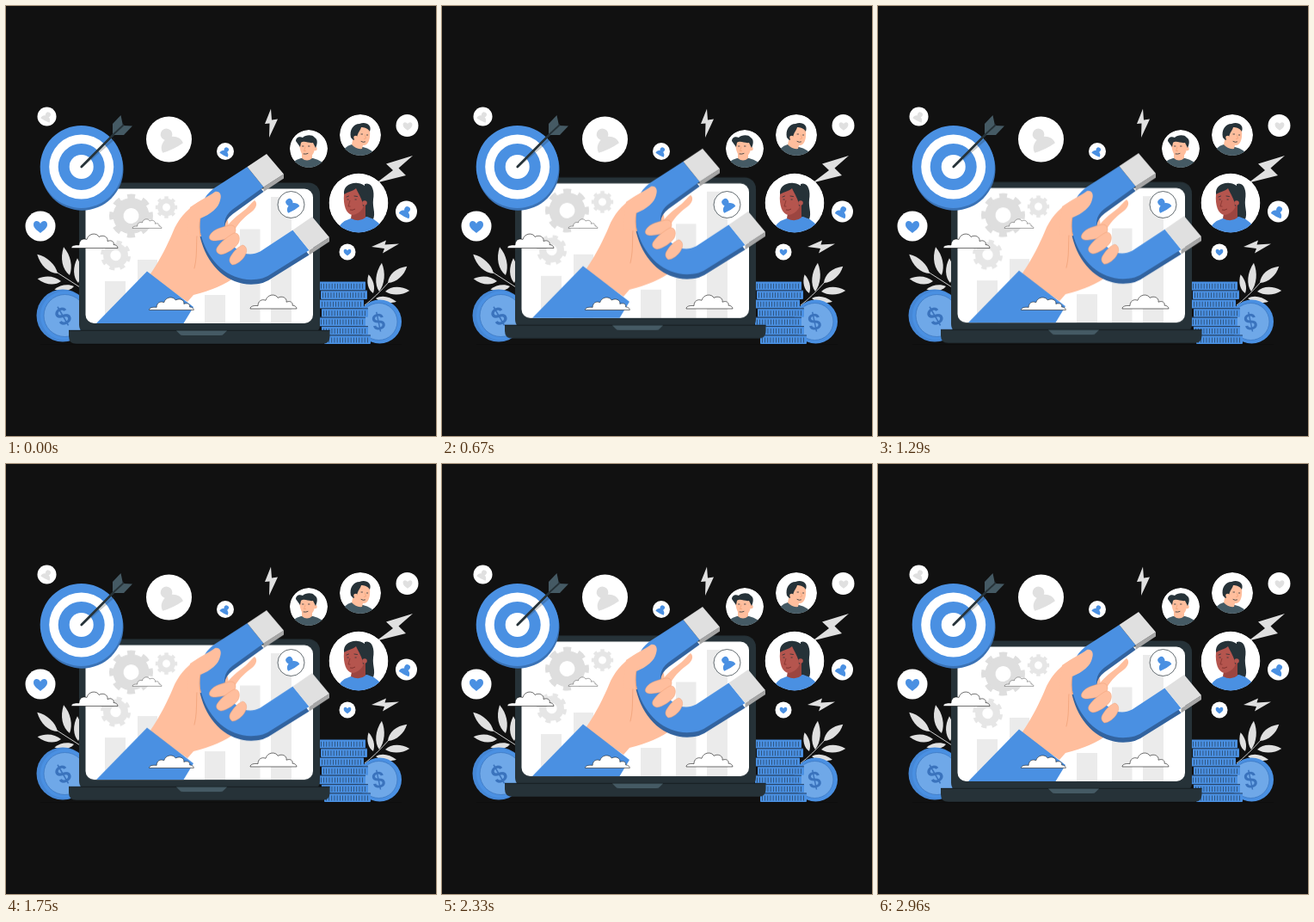
An HTML page without scripts for the animation above (3000 ms loop, 500x500 px).

```html
<!DOCTYPE html>
<html lang="en">
<head>
<meta charset="utf-8">
<title>Attracting customers</title>
<style>
html, body { margin: 0; width: 100%; height: 100%; overflow: hidden; background: #111; }
svg { display: block; width: 100vw; height: 100vh; }
.float { animation: float 1.5s -28ms infinite cubic-bezier(.37, 0, .63, 1); }
@keyframes float {
  0%, 100% { transform: translateY(0); }
  50% { transform: translateY(-6.3px); }
}
.blue { fill: #4a90e2; }
.deep { fill: #32639f; }
.pale { fill: #e0e0e0; }
.soft { fill: #ebebeb; }
.dark { fill: #263238; }
.skin { fill: #ffbe9d; }
.white { fill: #fff; }
.crease { fill: none; stroke: #eb996e; stroke-width: .6; stroke-linecap: round; }
.line { fill: none; stroke: #263238; stroke-width: .8; stroke-linecap: round; }
.stem { fill: none; stroke: #e0e0e0; stroke-width: .9; }
.cloud { fill: #fff; stroke: #111; stroke-width: .6; stroke-linejoin: round; }
.coin { font: 600 27px Inter, "Liberation Sans", sans-serif; fill: #3a73bd; text-anchor: middle; }
</style>
</head>
<body>
<svg viewBox="0 0 500 500">
<defs>
  <g id="user">
    <circle cy="-6.500" r="6.500"/>
    <path d="M-12.500 10C-13 3 -8 0 -4 -2H4C8 0 13 3 12.500 10Q0 12 -12.500 10Z"/>
  </g>
  <path id="heart" d="M0 7C-5 3 -8 1 -8 -3C-8 -8 -2 -8 0 -4C2 -8 8 -8 8 -3C8 1 5 3 0 7Z"/>
  <path id="cloud" class="cloud" d="M0 17C0 14 4 13 9 13.500C9 8 13 5 18 7C20 -1 30 -1 32 4C37 1 43 4 42 9C47 7 50 10 49 13C52 13 54 15 54 17Z"/>
  <g id="gear">
    <circle r="20.500"/>
    <circle r="22.500" fill="none" stroke-width="6" pathLength="16" stroke-dasharray="1 1"/>
    <circle r="9" class="white" stroke="none"/>
  </g>
  <g id="row">
    <rect width="54" height="10.400" rx="1" class="blue"/>
    <path d="M2 5.800H53" stroke="#263f5c" stroke-width="6" stroke-dasharray=".7 2.500"/>
    <path d="M0 .4H54" stroke="#1d2f48" stroke-width=".8"/>
  </g>
  <path id="leaf" d="M0 0C-7 -6 -7 -16 0 -25C6 -17 6 -7 0 0Z"/>
  <path id="magnet" d="M281 186.500L243 211C225 224 221 245 228 269C238 302 266 324 299 316Q305 314 312 309L353 283.500L334 260L296 285C281 293 266 284 259 270C252 256 253 244 264 236L300 210Z"/>
  <clipPath id="screen"><rect x="92.500" y="212.500" width="264.500" height="156.500" rx="10"/></clipPath>
  <clipPath id="c1"><circle cx="352" cy="166" r="22"/></clipPath>
  <clipPath id="c2"><circle cx="412" cy="150" r="24"/></clipPath>
  <clipPath id="c3"><circle cx="410" cy="229" r="34.500"/></clipPath>
</defs>

<rect width="500" height="500" fill="#111"/>
<path d="M40 393.500H460" stroke="#000" stroke-opacity=".4" stroke-width=".6"/>

<!-- plants -->
<g class="pale">
  <use href="#leaf" transform="translate(74 313) rotate(-12) scale(1 1.340)"/>
  <use href="#leaf" transform="translate(60 311) rotate(-47) scale(1 1.300)"/>
  <use href="#leaf" transform="translate(64 320) rotate(-84) scale(.9 1.100)"/>
  <use href="#leaf" transform="translate(79 326) rotate(-99) scale(.7 .92)"/>
  <use href="#leaf" transform="translate(84 322) rotate(-2) scale(.85 1.150)"/>
  <use href="#leaf" transform="translate(434 332) rotate(5) scale(.95 1.340)"/>
  <use href="#leaf" transform="translate(444 322) rotate(49) scale(1 1.180)"/>
  <use href="#leaf" transform="translate(441 332) rotate(88) scale(.9 1.130)"/>
  <use href="#leaf" transform="translate(430 340) rotate(99) scale(.7 .97)"/>
  <use href="#leaf" transform="translate(427 334) rotate(-14) scale(.7 .9)"/>
</g>
<path class="stem" d="M58 309Q72 318 86 327M417 348Q430 338 446 320"/>

<!-- loose coins -->
<circle cx="66" cy="360" r="30.500" fill="#4587d6"/>
<circle cx="68.500" cy="360" r="28.500" class="blue"/>
<circle cx="68.500" cy="360" r="24.500" fill="#6fa8e8" stroke="#3a75bd" stroke-width=".7"/>
<text class="coin" transform="translate(71 369) rotate(-30)">$</text>
<circle cx="434.500" cy="367" r="25.500" class="blue"/>
<circle cx="433.500" cy="367" r="21.500" fill="#6fa8e8" stroke="#3a75bd" stroke-width=".7"/>
<text class="coin" transform="translate(435 376) rotate(-12)" style="font-size:25px">$</text>

<!-- stack -->
<use href="#row" x="364" y="320"/>
<use href="#row" x="366" y="330.500"/>
<use href="#row" x="362" y="341"/>
<use href="#row" x="367" y="351.400"/>
<use href="#row" x="364" y="361.800"/>
<use href="#row" x="367" y="372.200"/>
<use href="#row" x="370" y="382.600"/>

<!-- laptop -->
<g class="float">
  <rect x="85" y="205.500" width="280" height="178" rx="13" class="dark"/>
  <rect x="92.500" y="212.500" width="264.500" height="156.500" rx="10" class="white"/>
  <g clip-path="url(#screen)">
    <path class="soft" d="M115 320h24v50h-24zM153 295h23v75h-23zM231 336h24v34h-24zM272 259.500h23.500v110h-23.500zM308 222h24v148h-24z"/>
    <use href="#gear" transform="translate(145.500 244) rotate(-11)" fill="#dedede" stroke="#dedede"/>
    <use href="#gear" transform="translate(186.500 234) rotate(-11) scale(.5)" fill="#e6e6e6" stroke="#e6e6e6"/>
    <use href="#gear" transform="translate(127.500 290) rotate(4) scale(.69)" fill="#e6e6e6" stroke="#e6e6e6"/>
  </g>
  <path class="dark" d="M73 377H376.500V384Q376.500 392.700 368 392.700H82Q73 392.700 73 384Z"/>
  <path d="M73 377.300H376.500" stroke="#12191c" stroke-width=".8"/>
  <path fill="#455a64" d="M198 377.500H257L253 381.500Q252 383 249 383H206Q203 383 202 381.500Z"/>
</g>

<!-- bubble over the screen -->
<circle cx="331.500" cy="231" r="15.500" class="white" stroke="#263238" stroke-width=".7"/>
<use href="#user" class="blue" transform="translate(331.500 231.500) rotate(-32) scale(.62)"/>

<!-- hand and magnet -->
<g class="float">
  <path class="skin" d="M253 262C259 252 266 246 274 240C281 235 285 229 289 226C293 229 291 235 286 239C279 244 272 250 266 260Z"/>
  <path class="skin" d="M167 313C180 294 188 277 194 263C200 248 209 238 222 229L246 215L258 250L268 314Q250 328 218 336L211 344Z"/>
  <path class="crease" d="M225 250C219 268 224 286 219 305"/>
  <path class="blue" d="M105 369L164 308.500L218 350L206.500 369Z"/>

  <g transform="translate(-.5 .6)">
    <use href="#magnet" class="deep" y="5.500"/>
    <path fill="#a6a6a6" d="M300 210L323.500 195V200L300 215.500ZM353 283.500L376.500 268.500V273.500L353 289Z"/>
    <use href="#magnet" class="blue"/>
    <path class="pale" d="M281 186.500L303.500 171.500L323.500 195L300 210ZM334 260L356.500 244.500L376.500 268.500L353 283.500Z"/>
  </g>

  <path class="skin" d="M214 234C224 227 236 221 243 216C249 215 251 220 249 226C247 235 238 242 226 247C225 254 225 261 227 268L210 266Z"/>
  <path class="crease" d="M226 247Q224 256 226 267"/>
  <g class="skin" stroke="#eb996e" stroke-width=".4">
    <path d="M238 265C242 259 252 257 260 255C267 254 269 261 265 266C259 271 249 273 241 273C236 272 235 269 238 265Z"/>
    <path d="M246 280C250 274 258 268 265 264C271 263 273 270 270 276C266 282 257 288 250 289C245 288 243 284 246 280Z"/>
    <path d="M262 290C265 285 270 280 275 278C280 279 281 285 278 290C275 296 268 301 263 301C259 298 259 294 262 290Z"/>
  </g>
</g>

<!-- target -->
<circle cx="88.500" cy="189.700" r="48" fill="#3a72b5"/>
<circle cx="87.700" cy="187" r="48" class="blue"/>
<circle cx="87.700" cy="187" r="37.500" class="white"/>
<circle cx="87.700" cy="187" r="27" class="blue"/>
<circle cx="87.700" cy="187" r="14" class="white"/>
<path d="M88 187L126 154" stroke="#263238" stroke-opacity=".25" stroke-width="2.500"/>
<path d="M87.700 187L131 143.500" stroke="#263238" stroke-width="2.600" stroke-linecap="round"/>
<path fill="#455a64" d="M124 149L124 137L133.500 127L136 139L147 139.500L137 150L125 150Z"/>
<path d="M123 151L137 138" stroke="#263238" stroke-width="1.800"/>

<!-- clouds -->
<use href="#cloud" transform="translate(76 264.500)"/>
<use href="#cloud" transform="translate(147 247.500) scale(.63 .64)"/>
<use href="#cloud" transform="translate(166.500 338.500) scale(.96 .88)"/>
<use href="#cloud" transform="translate(284 335.500) scale(1 .97)"/>

<!-- bolts -->
<g class="pale">
  <path d="M308 119.500L301 137L306.500 136.500L306 153L316 131.500L309 132.500Z"/>
  <path d="M473 174L442 183.500L450 191L431 205.500L465 197L456.500 188.500Z"/>
  <path d="M425 280L440 282L438 287.500L457 276.500L440.500 277.500L442 272.500Z"/>
</g>

<!-- icon bubbles -->
<g class="white">
  <circle cx="47.500" cy="128.500" r="11"/>
  <circle cx="189.500" cy="155" r="26.500"/>
  <circle cx="255" cy="169" r="10"/>
  <circle cx="466.500" cy="139" r="13"/>
  <circle cx="465.500" cy="239" r="12.500"/>
  <circle cx="397" cy="286" r="9.500"/>
  <circle cx="40" cy="256" r="17.500"/>
</g>
<g class="pale">
  <use href="#user" transform="translate(47.500 129) rotate(28) scale(.46)"/>
  <use href="#user" transform="translate(189.500 155.500) rotate(-26) scale(1.050)"/>
  <use href="#heart" transform="translate(467 140) scale(.68)"/>
</g>
<g class="blue">
  <use href="#user" transform="translate(255 169.500) rotate(28) scale(.42)"/>
  <use href="#user" transform="translate(465 239.500) rotate(28) scale(.52)"/>
  <use href="#heart" transform="translate(40 257)"/>
  <use href="#heart" transform="translate(397 286.500) scale(.54)"/>
</g>

<!-- man, left -->
<g clip-path="url(#c1)">
  <circle cx="352" cy="166" r="22" class="white"/>
  <path fill="#455a64" d="M330 190Q331 180 343 177H357Q370 180 373 190Z"/>
  <path class="skin" d="M344 168H356V177Q350 182 344 177Z"/>
  <path class="skin" d="M341 157C344 153 355 153 359 158C360 167 358 175 351 176C344 176 341 168 341 157Z"/>
  <circle cx="359.500" cy="166" r="2.300" class="skin"/>
</g>
<path class="dark" d="M337 157C337 153 341 151 345 153C348 150 356 149 359 153C363 155 362 161 360 165L357 159C352 160 347 156 343 159L342 164Z"/>
<path class="line" d="M344.500 163h1.500M351.500 163h1.500M346 172q3 .5 5 -.5"/>
<path class="crease" d="M348 164l-1.500 4.500h2"/>

<!-- man, right -->
<g clip-path="url(#c2)">
  <circle cx="412" cy="150" r="24" class="white"/>
  <path fill="#455a64" d="M388 177Q391 164 402 161L415 164Q428 167 431 177Z"/>
  <path class="skin" d="M404 152L416 158L414 166Q407 167 402 161Z"/>
  <path class="skin" d="M407 142C412 138 421 140 423 145C424 155 421 162 416 162C409 161 404 151 407 142Z"/>
  <path class="dark" d="M401 153C399 144 404 137 411 137C418 134 426 138 423 146C421 142 416 141 413 141C412 145 409 147 408 153L404 156Z"/>
  <circle cx="406.500" cy="153" r="2.300" class="skin"/>
</g>
<path class="line" d="M413 149h1.500M419.500 150h1.200M413 157.500q2.500 1.500 4.500 .5"/>
<path class="crease" d="M417.500 150l1 4-2 .5"/>

<!-- woman -->
<g clip-path="url(#c3)">
  <circle cx="410" cy="229" r="34.500" class="white"/>
  <path class="dark" d="M417 207C425 204 429 214 427 225C426 235 430 240 427 248L417 246Z"/>
  <path class="blue" d="M383 265Q387 251 401 247L420 245Q435 249 441 265Z"/>
  <path fill="#9c4540" d="M403 235L418 226V246Q411 252 401 247Z"/>
  <path fill="#b5554e" d="M393 219C396 209 412 208 418 219C419 233 412 242 403 243C395 242 392 231 393 219Z"/>
  <path class="dark" d="M393 219C392 210 400 205 409 206C420 207 424 217 419 229L415 233C415 225 410 219 407 212C404 215 398 216 393 219Z"/>
  <circle cx="417" cy="229" r="2.800" fill="#b5554e"/>
</g>
<path class="line" d="M397 225h1.200M406 225h1.200M396 222l2.500 -1M405 221l3.500 .5"/>
<path d="M400 226l-2 7h2.500" fill="none" stroke="#7c302c" stroke-width=".7"/>
<path d="M400 237q3 1 6 -1" fill="none" stroke="#7c302c" stroke-width=".9"/>
</svg>
</body>
</html>
```
